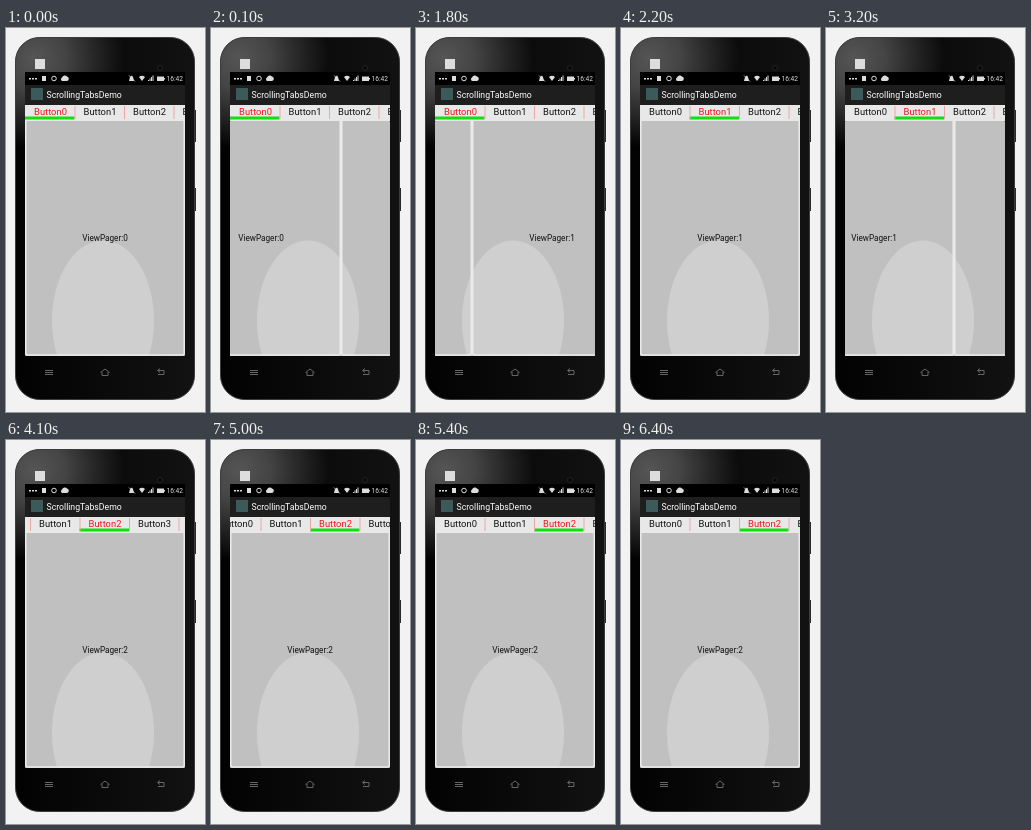
An HTML page that plays this animation: 199x384 px, repeating every 7300 ms.

```html
<!DOCTYPE html>
<html lang="en">
<head>
<meta charset="utf-8">
<title>Scrolling tabs</title>
<style>
  html, body { margin: 0; width: 100%; height: 100%; overflow: hidden; background: #f2f2f2; }
  svg { display: block; font-family: Roboto, sans-serif; }
  .tab { font-size: 9.4px; text-anchor: middle; fill: #111; }
  .tab.on { fill: #f01818; }
  .page { font-size: 8.2px; text-anchor: middle; fill: #111; }
</style>
</head>
<body>
<svg width="199" height="384" viewBox="0 0 199 384">
  <defs>
    <linearGradient id="body">
      <stop offset="0" stop-color="#020202"/>
      <stop offset="1" stop-color="#121212"/>
    </linearGradient>
    <radialGradient id="sheen" gradientUnits="userSpaceOnUse" cx="28" cy="30" r="90">
      <stop offset="0" stop-color="#555"/>
      <stop offset=".35" stop-color="#444"/>
      <stop offset="1" stop-color="#444" stop-opacity="0"/>
    </radialGradient>
  </defs>

  <!-- phone -->
  <path d="M187 82h3v32h-3zM187 160h3v23h-3z" fill="#2a2a2a"/>
  <rect x="9.500" y="9.500" width="179" height="362" rx="24" fill="url(#body)"/>
  <rect x="9.500" y="9.500" width="179" height="362" rx="24" fill="url(#sheen)" stroke="#3c3c3c"/>
  <circle cx="154" cy="40" r="2.500" fill="#080808" stroke="#222"/>
  <rect x="29" y="31" width="10" height="10" fill="#ddd"/>
  <g fill="none" stroke="#666">
    <path d="M39 342.500h8M39 344.500h8M39 346.500h8"/>
    <path d="M94.500 344.500l4.500-3.500 4.500 3.500M96 344v3.500h6V344"/>
    <path d="M154 340.500l-2.500 2 2.500 2M152 342.500h6v4h-6"/>
  </g>

  <!-- status bar -->
  <rect x="19" y="44" width="160" height="13" fill="#000"/>
  <g fill="#ddd">
    <path d="M23 50h2v1.500h-2zM26 50h2v1.500h-2zM29 50h2v1.500h-2z"/>
    <path d="M36 48h4v5h-4z"/>
    <path d="M56 53a2 2 0 0 1 0-3.500a3 3 0 0 1 5-1a2.300 2.300 0 0 1 0 4.500z"/>
    <path d="M123 53l1-4 2-1.500 1 1.500 1 4z"/>
    <path d="M133 49q3-2.500 6 0l-3 4z"/>
    <path d="M142 52h1v1h-1zM143.500 50.500h1v2.500h-1zM145 49h1v4h-1zM146.500 47.500h1v5.500h-1z"/>
    <path d="M151 48.500h7v4.500h-7zM158 50h1v1.500h-1z"/>
    <text x="160.500" y="53.300" font-size="6.600">16:42</text>
  </g>
  <circle cx="48" cy="50.500" r="2.300" fill="none" stroke="#ddd"/>
  <path d="M123 47.500l6 6" stroke="#ddd" stroke-width=".8"/>

  <!-- title bar -->
  <rect x="19" y="57" width="160" height="20" fill="#1e1e1e"/>
  <rect x="25" y="60" width="12" height="12" fill="#3c5a5a"/>
  <text x="40.500" y="69.700" font-size="8.700" fill="#fff">ScrollingTabsDemo</text>

  <svg x="19" y="77" width="160" height="16">
    <rect width="160" height="16" fill="#e8e8e8"/>
    <g id="tabs"><rect id="mark" y="11.500" width="49.500" height="3" fill="#12df12"/></g>
  </svg>

  <svg x="19" y="93" width="160" height="235">
    <rect width="160" height="235" rx="1" fill="#c0c0c0"/>
    <ellipse cx="78" cy="199.500" rx="51" ry="80" fill="#cfcfcf"/>
    <g id="pages"></g>
  </svg>
</svg>

<script>
const LOOP = 7300, TAB = 49.5, PAGE = 160;

// start time, pager scroll, selected tab, tab strip scroll
const steps = [
  [0, 0, 0, 0],
  [100, 49, 0, 0],
  [1800, 123, 0, 0],
  [2200, 160, 1, 0],
  [3200, 211, 1, 0],
  [3600, 290, 2, 20],
  [4100, 320, 2, 44.5],
  [4600, 320, 2, 42.5],
  [5000, 320, 2, 19],
  [5400, 320, 2, 0]
];

const $ = id => document.getElementById(id);
const tabs = $('tabs'), pages = $('pages'), mark = $('mark');

function add(parent, name, attrs, text = '') {
  const el = document.createElementNS('http://www.w3.org/2000/svg', name);
  for (const key in attrs) el.setAttribute(key, attrs[key]);
  el.textContent = text;
  return parent.appendChild(el);
}

const labels = [0, 1, 2, 3, 4].map(i => {
  if (i) add(tabs, 'rect', { x: i * TAB, y: 1, width: 1, height: 13, fill: '#eda5a5' });
  return add(tabs, 'text', { x: i * TAB + 25.5, y: 10, class: 'tab' }, 'Button' + i);
});

for (let i = 0; i < 3; i++) {
  const x = i * PAGE;
  add(pages, 'rect', { x: x + 0.75, y: -1, width: PAGE - 1.5, height: 235, rx: 2,
    fill: 'none', stroke: '#ebebeb', 'stroke-width': 1.5 });
  add(pages, 'text', { x: x + 80, y: 119.8, class: 'page' }, 'ViewPager:' + i);
}

const shift = (el, x) => el.setAttribute('transform', `translate(${-x} 0)`);

function draw(now) {
  const t = now % LOOP;
  const [, pager, selected, strip] = steps.findLast(s => s[0] <= t);
  shift(pages, pager);
  shift(tabs, strip);
  mark.setAttribute('x', selected * TAB);
  labels.forEach((el, i) => el.classList.toggle('on', i === selected));
}

const start = performance.now();
function frame() {
  draw(performance.now() - start);
  requestAnimationFrame(frame);
}
frame();
</script>
</body>
</html>
```
